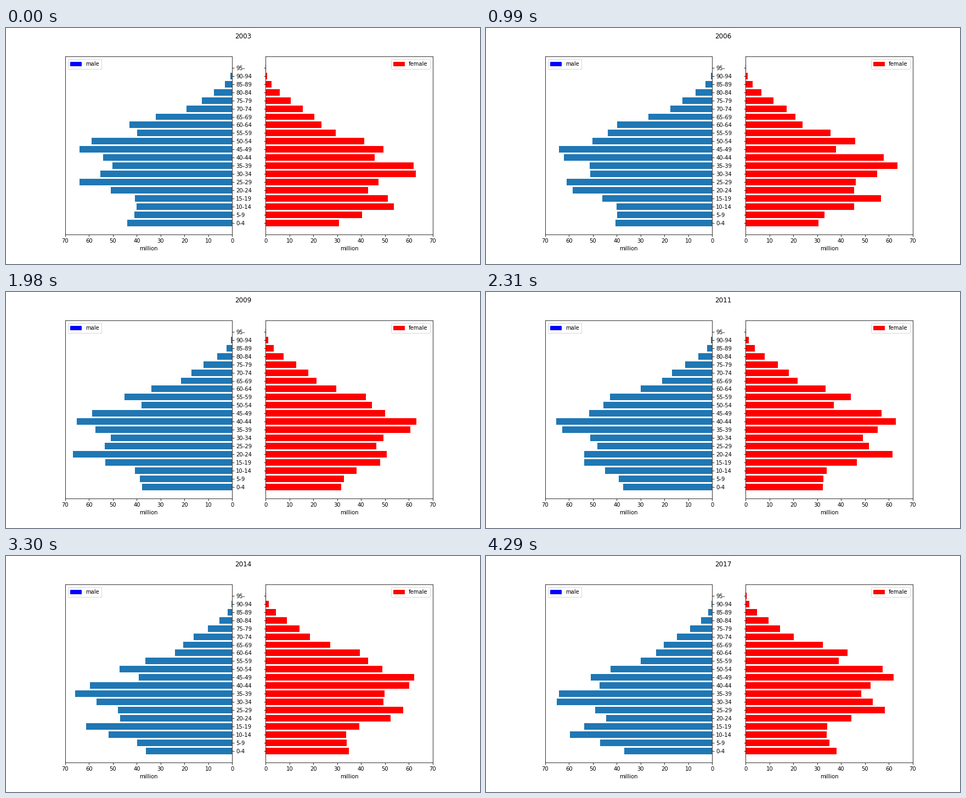
A matplotlib script that plays this animation: 864 by 432 pixels, repeating every 4620 ms.

```python
import matplotlib.pyplot as plt
import numpy as np
from matplotlib.animation import FuncAnimation
from matplotlib.patches import Patch

plt.rcParams.update({"font.family": "DejaVu Sans", "font.size": 10})

YEARS = [year for year in range(2003, 2018) if year != 2010]
AGES = np.arange(0, 100, 5)
LABELS = [f"{age}-{age + 4}" for age in AGES[:-1]] + ["95-"]

# Turning points of the birth curve: (year, girls per age group in millions).
BIRTHS = [(1906, 5), (1921, 16), (1935, 26.3), (1944, 28), (1952, 46.5),
          (1956, 51.5), (1959, 39.5), (1961, 47), (1963, 57.5), (1967, 65),
          (1971, 64.5), (1976, 51), (1981, 49), (1984, 52), (1989, 62),
          (1993, 49.5), (1999, 34.5), (2004, 34), (2010, 36.5), (2015, 42.5)]


def survival(age, lifespan, spread):
    return np.exp(-np.exp((age - lifespan) / spread))


def population(year, male):
    """Follow each birth cohort to its size in the given year."""
    age = AGES + 2
    born = year - age
    size = np.interp(born, *zip(*BIRTHS))
    if male:
        size *= np.interp(born, [1985, 1999, 2015], [1.035, 1.2, 1.15])
        size *= survival(age, 79.5, 10.5)
    else:
        size *= survival(age, 82, 11)
    size *= 1 - 0.15 * np.exp(-age / 5)  # infants are undercounted
    if year < 2010:  # so are young adults in the earlier surveys
        size *= 1 - 0.12 * np.exp(-((age - 21.5) / 7) ** 2)
    return size


fig, (left, right) = plt.subplots(1, 2, figsize=(12, 6), dpi=72)
fig.subplots_adjust(left=0.125, right=0.9, bottom=0.125, top=0.88, wspace=0.2)
title = fig.suptitle("", fontsize=12)


def panel(ax, color, xlim, label, swatch, loc):
    bars = ax.barh(LABELS, np.zeros(len(LABELS)), color=color)
    ax.set(xlim=xlim, xticks=range(0, 71, 10), xlabel="million",
           ylim=(-1.39, 20.39))
    ax.legend(handles=[Patch(color=swatch, label=label)], loc=loc)
    return bars


male_bars = panel(left, "C0", (70, 0), "male", "blue", "upper left")
female_bars = panel(right, "red", (0, 70), "female", "red", "upper right")
left.yaxis.tick_right()
right.tick_params(labelleft=False)


def set_widths(bars, values):
    for bar, value in zip(bars, values):
        bar.set_width(value)


def update(i):
    title.set_text(str(YEARS[i]))
    # The male panel runs through the years backwards.
    set_widths(male_bars, population(YEARS[-1 - i], male=True))
    set_widths(female_bars, population(YEARS[i], male=False))
    return [title, *male_bars, *female_bars]


anim = FuncAnimation(fig, update, frames=len(YEARS), interval=330,
                     init_func=lambda: update(0), repeat=True, repeat_delay=0)
plt.show()
```
